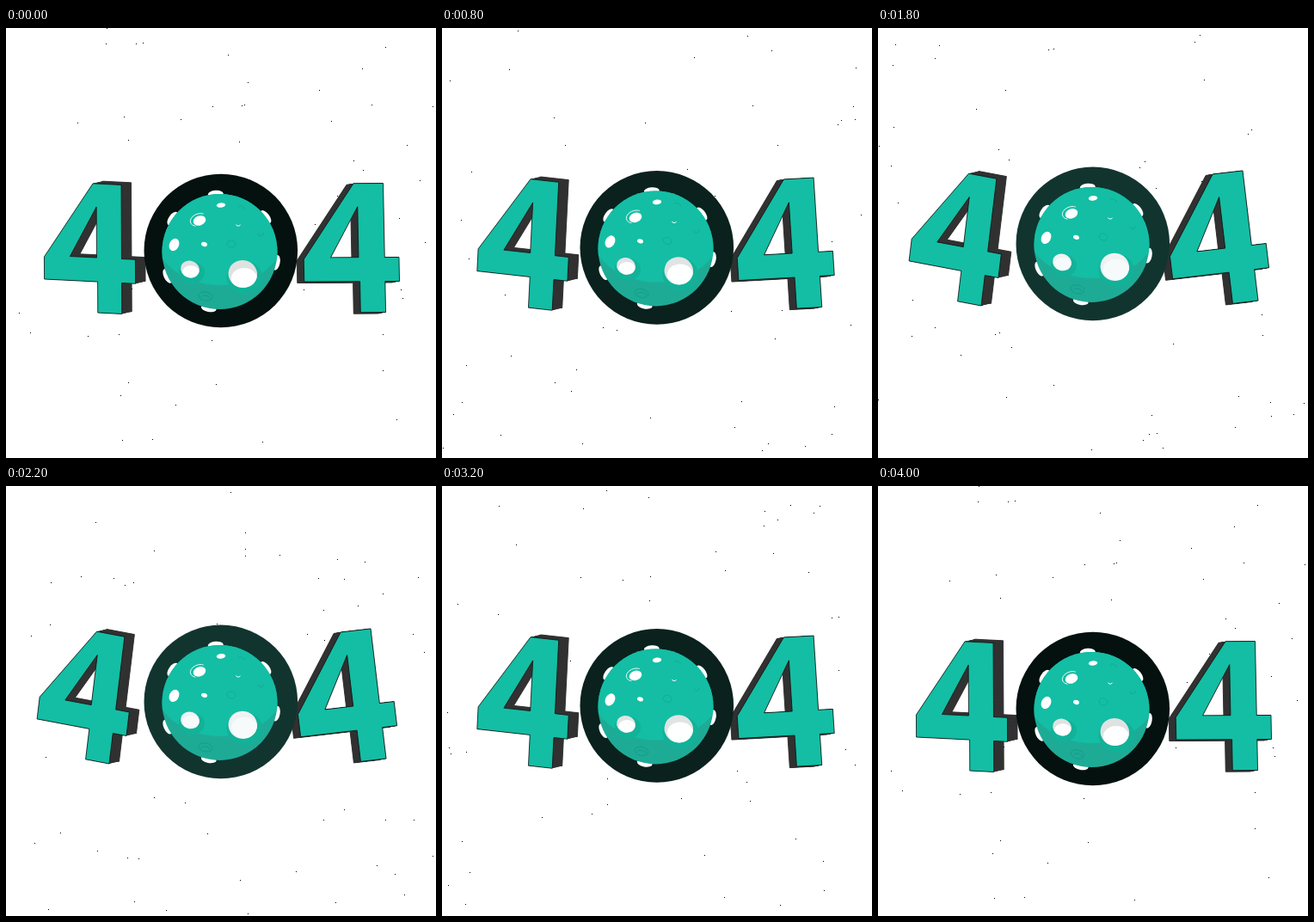
An HTML page with a canvas for the animation above (4200 ms loop, 500 px wide and 500 px high).

```html
<!DOCTYPE html>
<html lang="en">
<head>
<meta charset="utf-8">
<title>404</title>
<style>
html, body { margin: 0; width: 100%; height: 100%; overflow: hidden; background: #fff; }
canvas { display: block; }
</style>
</head>
<body>
<canvas id="stage" width="500" height="500"></canvas>
<script>
const ctx = document.getElementById('stage').getContext('2d');
const STEP = 200, LOOP = 4200, HALF = 10;
const GREEN = '#13bea4', DENT = '#12ad95';

// One flat "4" serves both digits
const four = new Path2D('M57 0H90V86H106V114H90V150H62V114H0V88Z M61 27V86H30Z');

// Affine pose of each digit at the bottom and top of the swing
const digits = [
  { low: [1, .05, .005, 1, 44, 178], high: [.978, .2, -.133, .983, 50.3, 156.5], depth: [11.5, -2.7] },
  { low: [1.045, -.005, .02, 1, 344.5, 181], high: [1.058, -.136, .131, 1.008, 327.2, 176.5], depth: [-8, 1.5] }
];

const mix = (a, b, t) => a + (b - a) * t;
const rgb = (a, b, t) => `rgb(${a.map((v, i) => Math.round(mix(v, b[i], t)))})`;

function random(seed) {
  return () => {
    seed = (seed + 0x6D2B79F5) | 0;
    let t = Math.imul(seed ^ seed >>> 15, 1 | seed);
    t = t + Math.imul(t ^ t >>> 7, 61 | t) ^ t;
    return ((t ^ t >>> 14) >>> 0) / 4294967296;
  };
}

function oval(x, y, rx, ry, color, turn = 0) {
  ctx.fillStyle = color;
  ctx.beginPath();
  ctx.ellipse(x, y, rx, ry, turn, 0, 7);
  ctx.fill();
}

function arc(x, y, rx, ry, turn, from, to, color) {
  ctx.strokeStyle = color;
  ctx.lineWidth = 1;
  ctx.beginPath();
  ctx.ellipse(x, y, rx, ry, turn, from, to);
  ctx.stroke();
}

function clipOval(x, y, rx, ry, turn, paint) {
  ctx.save();
  ctx.beginPath();
  ctx.ellipse(x, y, rx, ry, turn, 0, 7);
  ctx.clip();
  paint();
  ctx.restore();
}

function drawStars(step) {
  const rnd = random(step * 977 + 41);
  ctx.fillStyle = '#000';
  for (let i = 0; i < 60; i++)
    ctx.fillRect(Math.floor(rnd() * 500), Math.floor(rnd() * 500), 1, 1);
}

function drawDigit({ low, high, depth: [dx, dy] }, u) {
  const pose = low.map((v, i) => mix(v, high[i], u));
  const layers = 24;
  ctx.strokeStyle = '#111';
  ctx.lineWidth = 0.8;
  for (let k = layers; k >= 0; k--) {
    ctx.save();
    ctx.translate(dx * k / layers, dy * k / layers);
    ctx.transform(...pose);
    ctx.fillStyle = k ? '#323232' : GREEN;
    if (k === layers) ctx.stroke(four);
    ctx.fill(four, 'evenodd');
    if (!k) ctx.stroke(four);
    ctx.restore();
  }
}

function drawCrater(x, y, rx, ry, turn, u) {
  const lit = [244, 248, 250];
  oval(x + 2, y + 4, rx + 4, ry + 3, '#12b299');
  oval(x, y, rx, ry, rgb([224, 226, 226], lit, u ** 3), turn);
  clipOval(x, y, rx, ry, turn, () =>
    oval(x + rx * 0.1, y + ry * mix(0.33, 0.18, u), rx * 0.9, ry * 0.76, rgb([255, 255, 255], lit, u ** 3)));
}

function drawMoon(u) {
  const x = 248.5, y = 260, r = 67;
  ctx.save();
  ctx.translate(0, -9 * u);
  oval(249.8, 259, 89.3, 89.3, rgb([4, 17, 15], [19, 56, 50], u));

  // Craters that stick out behind the edge
  for (const deg of [-94, -145, -37, 11, 155, 101]) {
    const a = deg * Math.PI / 180;
    oval(x + r * Math.cos(a), y + r * Math.sin(a), 4.3, 9, '#fff', a);
  }

  oval(x, y, r, r, '#1eab96');
  clipOval(x, y, r, r, 0, () => oval(x, 235, 78, 64, GREEN));

  oval(225, 224, 7.5, 5.5, '#fff', -0.35);
  arc(224, 223, 10, 7, -0.35, 2.2, 5.6, '#e6f7f4');
  oval(250, 206, 5.2, 2.8, '#fff', -0.1);
  oval(195.5, 252, 5.5, 7.5, '#fff', 0.45);
  oval(230.5, 251.5, 3.6, 2.5, '#fff', 0.3);
  arc(270, 228, 2.6, 2.2, 0, 0.3, 2.9, '#fff');

  arc(262, 251, 5, 4, 0.3, 0, 7, DENT);
  arc(274, 210, 4, 2.5, 0.5, 3, 6, DENT);
  arc(296, 238, 3, 4, 0, 0, 3, DENT);
  arc(232, 312, 8, 5, 0.2, 0, 7, '#119f89');
  arc(232, 314, 5, 3, 0.2, 3, 6.3, '#119f89');

  drawCrater(214, 280.5, 11, 9.8, 0.3, u);
  drawCrater(275.3, 286, 16.8, 16, 0.3, u);
  ctx.restore();
}

function frame(now) {
  const step = Math.floor((now % LOOP) / STEP) % (2 * HALF);
  const u = 1 - Math.abs(step - HALF) / HALF;
  ctx.fillStyle = '#fff';
  ctx.fillRect(0, 0, 500, 500);
  drawStars(step);
  digits.forEach(d => drawDigit(d, u));
  drawMoon(u);
  requestAnimationFrame(frame);
}
frame(performance.now());
</script>
</body>
</html>
```
